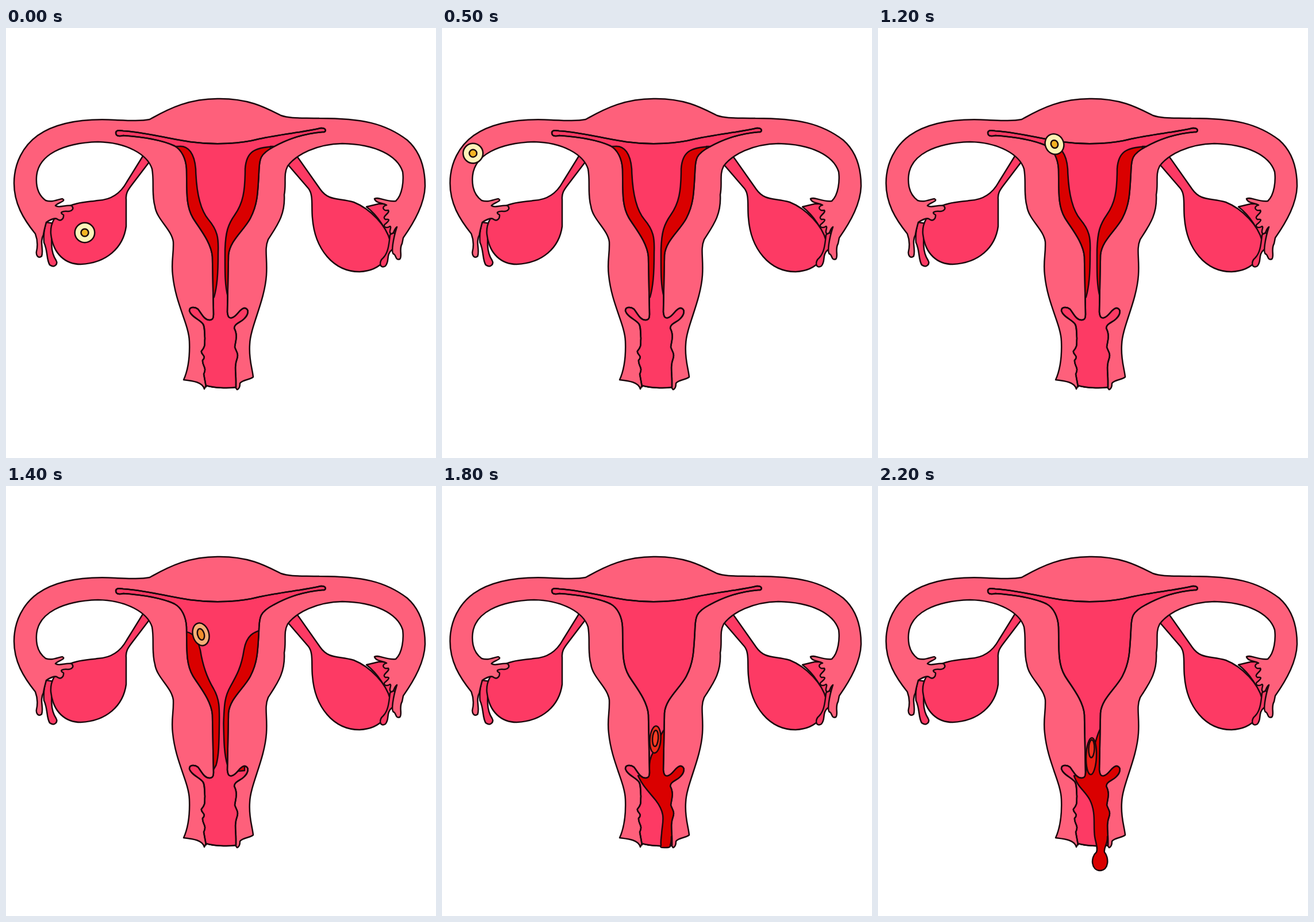
Animation, 748 px wide and 748 px high, one loop 2400 ms. Source, as an HTML page:

```html
<!DOCTYPE html>
<html>
<head>
<meta charset="utf-8">
<style>
  html, body { margin: 0; width: 100%; height: 100%; overflow: hidden; background: #fff; }
  svg { display: block; width: 100vw; height: 100vh; }
  path, ellipse { stroke: #1c080d; stroke-width: 2.5; stroke-linejoin: round; stroke-linecap: round; }
  .deep { fill: #fd3a64; }
  .flesh { fill: #fe607b; }
  .blood { fill: #da0000; }
  .line { fill: none; }
</style>
</head>
<body>
<svg viewBox="0 0 748 748">
  <defs>
    <path id="cavity" d="M348 624 L344 602 C350 590 341 588 342 578 C350 570 338 568 340 562
      C348 553 345 548 346 540 C345 528 346 518 342 514 C335 506 322 502 319 492 C319 484 329 485 334 489
      C341 498 345 508 354 508 C360 508 361 504 361 498 L359 398 C357 372 335 347 325 330
      C312 308 315 280 314 245 C313 228 306 212 293 205 C272 195 245 190 204 187 C196 189 191 188 191 182
      C192 177 198 178 204 179 C240 181 280 192 320 198 C365 204 410 201 440 193 C480 184 515 182 548 174
      C558 174 558 182 550 181 C510 185 485 196 465 207 C440 220 441 230 440 250 C438 290 437 308 425 331
      C414 352 389 370 387 395 L385 494 C386 503 388 505 393 504 C402 502 406 488 415 487
      C424 489 421 499 415 505 C409 512 397 514 397 522 C404 535 399 545 398 555 C400 562 405 566 402 575
      C397 588 400 600 400 614 L400 625"/>
    <clipPath id="inside">
      <use href="#cavity"/>
      <rect x="365" y="622" width="45" height="60"/>
    </clipPath>
  </defs>

  <!-- ovaries and the fringes beside them -->
  <g class="deep">
    <path d="M70 338 C66 350 65 360 66 373 C73 388 70 402 76 412 C84 418 91 411 87 404 C79 392 76 372 84 340Z"/>
    <path d="M241 218 L210 268 C198 290 180 299 160 300 C140 303 118 303 100 315 C82 328 77 343 78 358
      C82 394 104 411 130 411 C175 409 204 382 209 345 L209 298 C208 288 212 282 218 274 L250 232Z"/>
    <path d="M627 311 L648 306 L668 306 L682 345 L668 378 C664 350 645 325 627 311Z"/>
    <path d="M489 236 L526 279 C535 290 531 310 533 330 C537 385 570 424 615 424 C655 422 670 395 668 370
      C662 345 635 315 605 303 C580 295 562 302 547 281 L504 220Z"/>
    <path d="M668 360 C681 346 678 375 672 385 C660 395 668 405 660 414 C650 420 648 406 656 400 C664 392 666 380 668 360Z"/>
  </g>

  <path class="flesh" d="M372 123 C424 123 452 139 478 152 C495 158 515 156 545 157 C620 157 660 166 698 195
    C724 218 729 250 729 275 C728 305 712 335 691 365 L689 375 C683 385 690 397 685 402
    C677 405 679 394 674 393 C670 390 673 368 680 346 C674 350 676 358 670 358 C664 356 672 346 668 345
    C660 350 654 344 661 340 C668 334 667 332 660 333 C652 328 669 322 665 317 C655 319 653 310 662 308
    C655 304 643 305 641 297 C650 293 660 303 678 301 C690 290 692 265 690 250 C681 222 643 202 585 201
    C540 202 505 220 490 240 C482 255 488 270 484 290 C486 325 472 343 456 368 C449 385 455 400 453 430
    C450 475 425 520 424 550 C422 575 428 590 430 607 C425 612 411 612 407 618 C407 624 405 628 402 629
    L399 625 C385 627 362 626 348 622 L345 628 C342 616 326 614 309 612 C318 592 320 570 319 545
    C318 515 295 480 290 430 C287 405 292 395 291 372 C288 350 262 333 259 310 C253 290 258 265 254 245
    C246 220 210 199 160 198 C100 200 55 220 53 260 C52 278 58 292 69 300 C80 304 90 298 98 297
    C106 301 90 304 86 309 C92 314 104 307 114 309 C120 315 113 319 108 319 C98 318 92 321 100 325
    C101 331 96 337 90 333 C86 329 76 334 70 338 C68 346 66 352 65 360 C58 372 66 386 62 397
    C56 402 52 395 53 389 C56 376 54 366 51 358 C30 332 14 305 14 270 C14 235 30 205 55 187
    C88 164 135 157 190 160 C215 161 235 162 250 159 C285 139 321 122 372 123Z"/>
  <use href="#cavity" class="deep"/>
  <path class="line" d="M348 622 C362 626 385 627 399 625"/>
  <g clip-path="url(#inside)" class="blood">
    <path id="left"/>
    <path id="right"/>
    <path id="flow"/>
  </g>
  <use href="#cavity" class="line"/>
  <g id="egg"><ellipse id="shell"/><ellipse id="core"/></g>
</svg>
<script>
const $ = id => document.getElementById(id);
const STEP = 100, LOOP = 2400, LAST = 22;

// Keys are [step, string of numbers]; matching numbers are blended.
const blend = (a, b, k) => {
  const to = b.match(/-?[\d.]+/g);
  let i = 0;
  return a.replace(/-?[\d.]+/g, n => +(+n + (to[i++] - n) * k).toFixed(2));
};
const at = (keys, s) => {
  const i = keys.findIndex(key => key[0] >= s);
  if (i < 1) return keys[i ? keys.length - 1 : 0][1];
  const [s0, a] = keys[i - 1], [s1, b] = keys[i];
  return blend(a, b, (s - s0) / (s1 - s0));
};

const left = [
  [12, "M299 206C318 203 328 220 330 245C331 285 337 315 352 333C368 352 370 365 369 390C369 430 367 450 362 468L350 480L350 470C350 400 290 340 290 206Z"],
  [16, "M316 302C328 300 338 310 346 326C354 345 364 355 370 372C375 390 373 405 373 440C372 470 373 490 369 503C367 515 360 514 352 513L352 516L352 500C350 400 290 340 290 302Z"],
  [17, "M345 360C352 360 356 368 360 376C366 390 370 395 372 405C374 430 374 450 374 470C374 490 376 500 374 522L344 508L355 500C350 450 345 420 330 360Z"]
];
left[2][1] = left[2][1].replace("374 522L", "374 515C370 526 352 520 344 508L");
const right = [
  [12, "M466 206C432 208 418 215 416 245C416 285 412 305 398 325C386 342 382 355 381 385C381 420 380 445 386 468C388 472 390 474 392 475L400 480L400 470C400 400 460 340 460 206Z"],
  [16, "M438 292C426 297 418 308 412 325C403 345 390 355 383 372C375 390 377 405 376 440C377 470 379 490 385 505C388 520 396 522 405 518L430 510L430 480C400 400 460 340 460 292Z"],
  [17, "M410 352C402 354 396 366 392 374C386 388 382 395 380 405C378 430 378 450 378 470C376 490 372 510 376 525C380 570 384 590 402 595L430 510L430 480C400 430 430 380 430 352Z"]
];
const flow = [
  [18, "M387 423C380 432 375 445 368 462C362 472 360 480 361 500C355 506 345 503 341 504C348 520 358 530 372 547C391 572 383 585 382 605C381 615 380 620 381 625C379 629 381 629 387 629C393 629 398 629 397 625C399 620 399 615 399 610L412 600L412 525L430 500L425 480L392 470Z"],
  [22, "M387 421C382 432 378 445 376 455C372 472 362 480 361 500C355 506 345 503 341 504C348 525 358 528 368 545C380 568 374 590 377 610C379 622 383 630 380 637C369 646 371 669 386 669C402 669 402 646 394 637C392 630 400 622 399 610L412 600L412 525L430 500L425 480L392 470Z"]
];

const spots = [
  [0, "137 356"], [1, "108 340"], [2, "77 323"], [3, "45 298"], [4, "33 258"], [5, "54 218"],
  [6, "85 190"], [7, "120 178"], [8, "157 176"], [9, "196 181"], [10, "233 184"], [11, "271 190"],
  [12, "307 202"], [14, "339 258"], [16, "356 328"], [18, "371 441"], [22, "371 470"]
];
// shell radii, core radii, core rise, tilt, shell colour, core colour
const looks = [
  [0, "17.3 17.3 6.5 6.5 0 0 253 242 186 245 180 35"],
  [11, "17.3 17.3 6.5 6.5 0 -8 253 242 186 245 180 35"],
  [12, "16 18 6 7 0 -25 253 242 180 245 178 35"],
  [16, "12 22 5.5 13 0 -6 239 108 58 240 104 52"],
  [18, "9.5 23.5 5 14 2 4 236 45 28 247 62 38"],
  [22, "9 32 5 15.5 13 2 236 32 24 245 50 34"]
];

const set = (id, attrs) => {
  for (const name in attrs) $(id).setAttribute(name, attrs[name]);
};

function draw(s) {
  set("left", { d: s < 18 ? at(left, s) : "" });
  set("right", { d: s < 18 ? at(right, s) : "" });
  set("flow", { d: s < 18 ? "" : at(flow, s) });
  const [x, y] = at(spots, s).split(" ");
  const [rx, ry, cx, cy, rise, tilt, ...rgb] = at(looks, s).split(" ");
  set("egg", { transform: `translate(${x} ${y}) rotate(${tilt})` });
  set("shell", { rx, ry, fill: `rgb(${rgb.slice(0, 3)})` });
  set("core", { rx: cx, ry: cy, cy: -rise, fill: `rgb(${rgb.slice(3)})` });
}

const start = performance.now();
function tick() {
  const t = (performance.now() - start) % LOOP;
  draw(Math.min(LAST, Math.floor(t / STEP)));
  requestAnimationFrame(tick);
}
tick();
</script>
</body>
</html>
```
